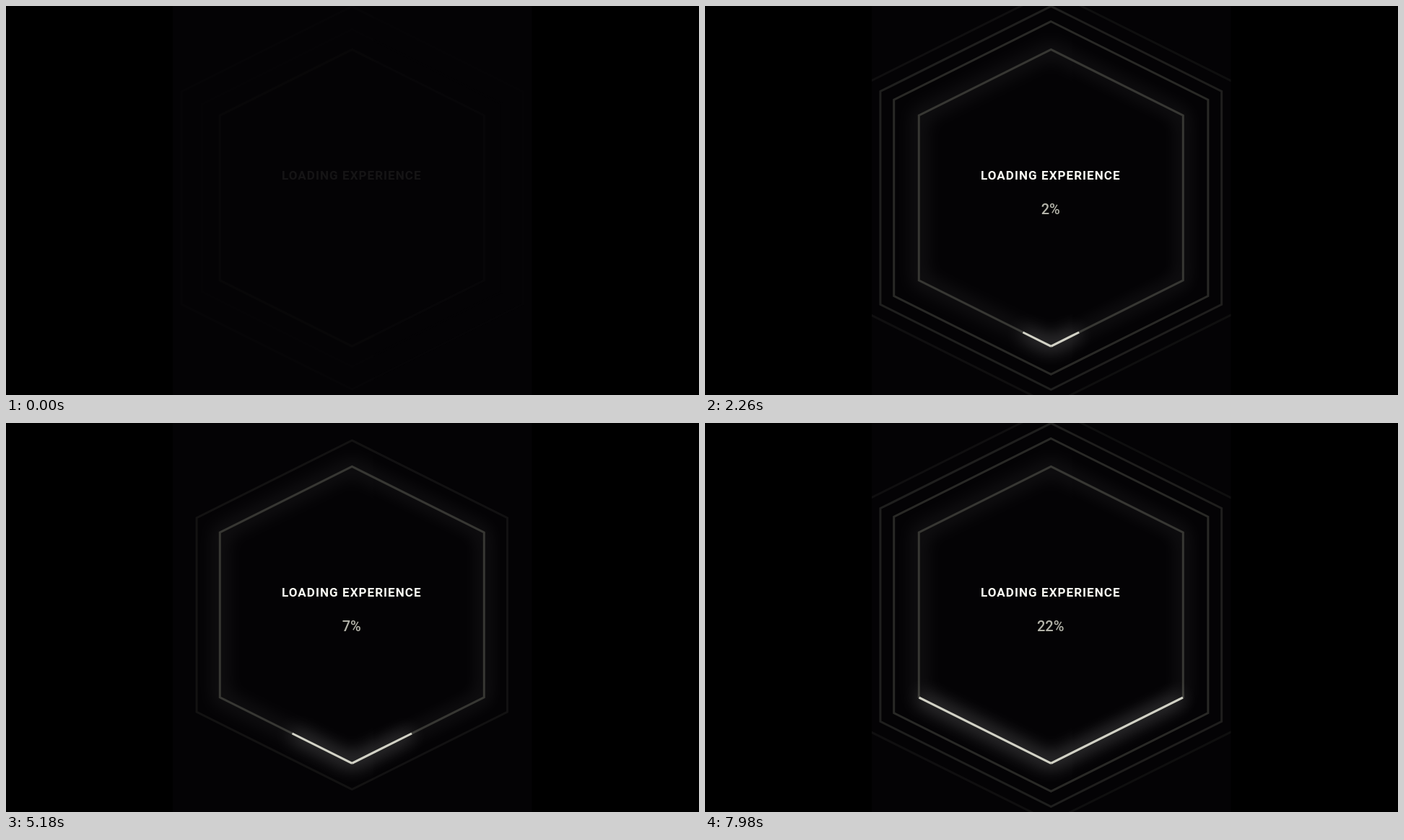
Animation of 960 by 540 pixels, one loop 8 s. Source, as an HTML page:

```html
<!DOCTYPE html>
<html lang="en">
<head>
<meta charset="utf-8">
<title>Loading</title>
<style>
  html, body { margin: 0; width: 100%; height: 100%; overflow: hidden; background: #000; }
  svg { display: block; width: 100%; height: 100%; }
  text { font-family: Roboto, Arial, sans-serif; }
  path { vector-effect: non-scaling-stroke; }
  #title { font-size: 17px; font-weight: 700; letter-spacing: 1.06px; fill: #fbfbf4; }
  #percent { font-size: 20px; font-weight: 500; fill: #b4b4aa; text-anchor: middle; }
</style>
</head>
<body>
<svg viewBox="0 0 960 540">
  <defs>
    <path id="hex" d="M0-206L183-114.5V114.5L0 206L-183 114.5V-114.5Z"/>
    <g id="arms">
      <path class="arm" pathLength="1" d="M0 206L183 114.5V-114.5L0-206"/>
      <path class="arm" pathLength="1" d="M0 206L-183 114.5V-114.5L0-206"/>
    </g>
    <clipPath id="frame"><path d="M231 0H728.5V540H231Z"/></clipPath>
    <filter id="soft" x="-30%" y="-30%" width="160%" height="160%"><feGaussianBlur stdDeviation="12"/></filter>
  </defs>
  <g clip-path="url(#frame)">
    <path d="M231 0H729V540H231Z" fill="#040305"/>
    <g transform="translate(479.3 266.4)" fill="none" stroke-width="3">
      <g id="lines">
        <use href="#hex" stroke="#fff" stroke-width="16" opacity=".07" filter="url(#soft)"/>
        <g id="rings" stroke="#2c2c29"></g>
        <use href="#hex" stroke="#373733"/>
      </g>
      <g id="progress">
        <use href="#arms" stroke="#fff" stroke-width="18" opacity=".16" filter="url(#soft)"/>
        <use href="#arms" stroke="#d2d2c6"/>
      </g>
    </g>
  </g>
  <text id="title" x="382" y="241">LOADING EXPERIENCE</text>
  <text id="percent" x="478.7" y="289">0%</text>
</svg>
<script>
const LOOP = 8000, PULSE = 5720, STAGGER = 520;
const EASE_TIME = 760, GLOW_TIME = 3600, FIRST_PULSE = -980;
const $ = id => document.getElementById(id);
const ramp = (t, from, to) => Math.min(1, Math.max(0, (t - from) / (to - from)));
const mix = (a, b, k) => a + (b - a) * k;

// Loading milestones: time, percentage shown, share of each arm drawn.
const milestones = [
  [1000, 1, 0], [2260, 2, .068], [4320, 6, .145],
  [5740, 8, .145], [6760, 12, .22], [7980, 22, .32]
];

function loading(t) {
  const index = milestones.findIndex(m => m[0] > t);
  if (index === 0) return [ramp(t, 0, 1000), 0];
  if (index < 0) return milestones[milestones.length - 1].slice(1);
  const [t0, count0, reach0] = milestones[index - 1];
  const [t1, count1, reach1] = milestones[index];
  const k = ramp(t, t0, t1);
  return [mix(count0, count1, k), mix(reach0, reach1, k)];
}

const rings = [.4, .3, .2].map((spread, index) => {
  const el = document.createElementNS("http://www.w3.org/2000/svg", "use");
  el.setAttribute("href", "#hex");
  $("rings").append(el);
  return { el, spread, start: FIRST_PULSE + index * STAGGER };
});

function draw(t) {
  for (const { el, spread, start } of rings) {
    const age = (t - start + PULSE) % PULSE;
    const growth = 1 - Math.exp(-age / EASE_TIME);
    el.setAttribute("transform", `scale(${1 + spread * growth})`);
    el.setAttribute("opacity", Math.max(0, Math.sin(Math.PI * Math.min(1, age / GLOW_TIME))));
  }

  $("lines").setAttribute("opacity", ramp(t, -100, 1100));
  $("title").setAttribute("opacity", ramp(t, -120, 1700));
  $("percent").setAttribute("opacity", ramp(t, 300, 1700));

  const [count, reach] = loading(t);
  $("percent").textContent = Math.round(count) + "%";
  $("progress").setAttribute("visibility", reach > 0 ? "visible" : "hidden");
  for (const arm of document.querySelectorAll(".arm")) {
    arm.setAttribute("stroke-dasharray", `${reach} 2`);
  }
}

const start = performance.now();
function tick() {
  draw((performance.now() - start) % LOOP);
  requestAnimationFrame(tick);
}
tick();
</script>
</body>
</html>
```
